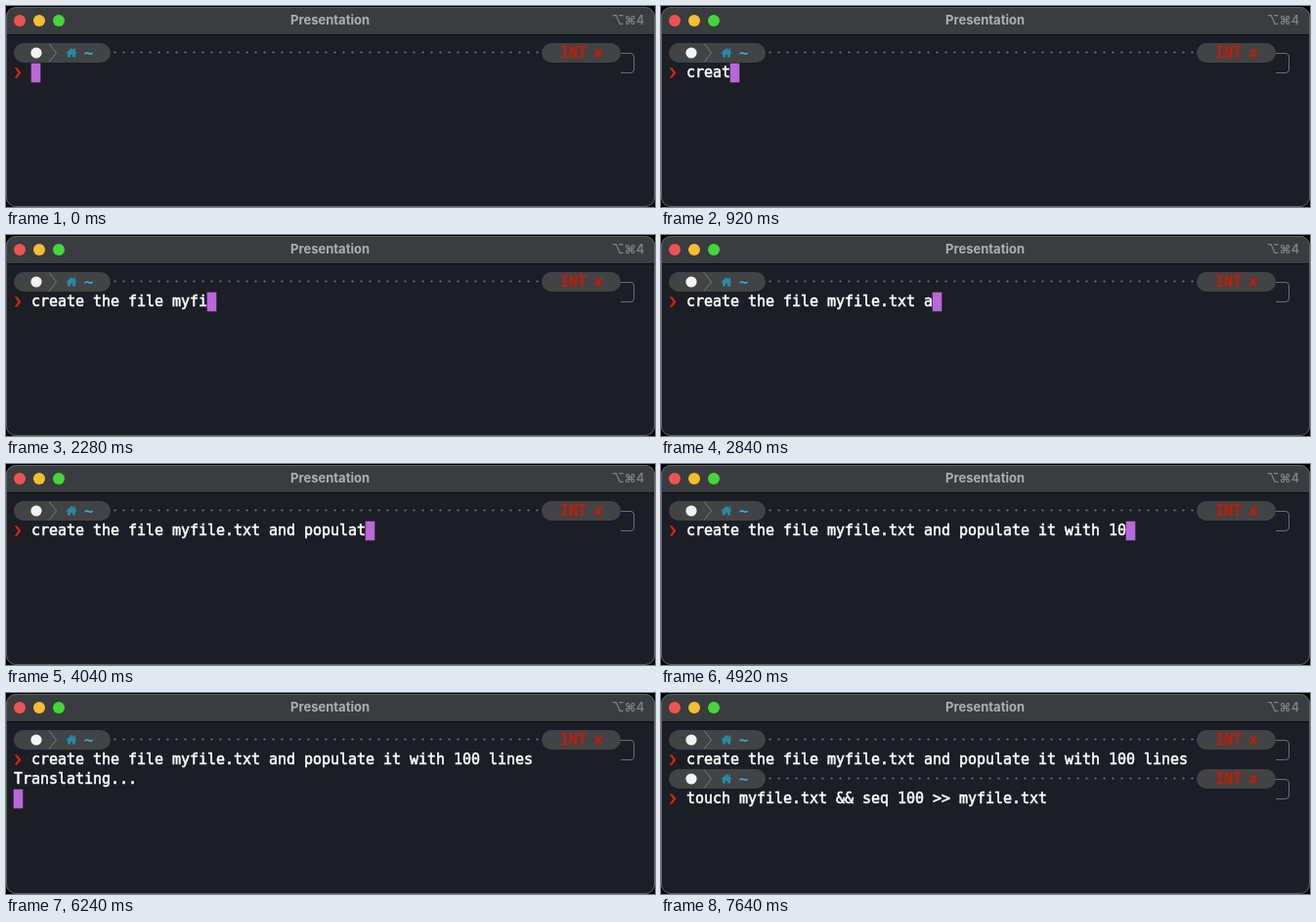
Recreate the animation shown at these times as an HTML page with a canvas. Size 664 by 206 pixels, loop 7760 ms.

```html
<!DOCTYPE html>
<html lang="en">
<head>
<meta charset="utf-8">
<title>Presentation</title>
<style>
html, body { margin: 0; width: 100%; height: 100%; overflow: hidden; background: #000; }
canvas { display: block; width: 664px; height: 206px; }
</style>
</head>
<body>
<canvas id="stage"></canvas>
<script>
const W = 664, H = 206, LOOP = 7760, TICK = 40;
const CELL = 9, ROW = 20, LEFT = 8, INPUT = 26;
const MONO = '"DejaVu Sans Mono", "Noto Sans Mono", monospace';
const SANS = 'Inter, "DejaVu Sans", sans-serif';
const REQUEST = 'create the file myfile.txt and populate it with 100 lines';
const COMMAND = 'touch myfile.txt && seq 100 >> myfile.txt';
const RED = '#c41d08';

// Typing rhythm: [characters typed, time in ms], even in between.
const KEYS = [
  [0, 520], [1, 600], [11, 1280], [12, 1360], [15, 1560], [16, 1640],
  [17, 1800], [18, 1920], [19, 2160], [28, 2840], [29, 2920], [30, 2960],
  [31, 3040], [32, 3360], [33, 3480], [34, 3760], [38, 4040], [43, 4440],
  [44, 4560], [50, 4920], [51, 4960], [55, 5280], [56, 5360], [57, 5560]
];

const canvas = document.getElementById('stage');
const ctx = canvas.getContext('2d');
const dpr = window.devicePixelRatio || 1;
canvas.width = W * dpr;
canvas.height = H * dpr;
ctx.scale(dpr, dpr);

const rowY = row => 48 + ROW * row;

function typedAt(t) {
  let i = KEYS.length - 1;
  while (i > 0 && KEYS[i][1] > t) i--;
  const [n, start] = KEYS[i];
  if (i === KEYS.length - 1) return n;
  const [next, end] = KEYS[i + 1];
  const part = Math.max(0, (t - start) / (end - start));
  return Math.min(next - 1, n + Math.floor((next - n) * part + 0.01));
}

function box(x, y, w, h, r, fill) {
  ctx.beginPath();
  ctx.roundRect(x, y, w, h, r);
  ctx.fillStyle = fill;
  ctx.fill();
}

function dot(x, y, r, fill) {
  ctx.beginPath();
  ctx.arc(x, y, r, 0, Math.PI * 2);
  ctx.fillStyle = fill;
  ctx.fill();
}

function trace(points) {
  ctx.beginPath();
  points.forEach(([x, y]) => ctx.lineTo(x, y));
}

function line(points, color, width) {
  trace(points);
  ctx.strokeStyle = color;
  ctx.lineWidth = width;
  ctx.stroke();
}

function shape(points, fill) {
  trace(points);
  ctx.fillStyle = fill;
  ctx.fill();
}

function label(str, x, y, font, color, align) {
  ctx.font = font;
  ctx.textAlign = align;
  ctx.fillStyle = color;
  ctx.fillText(str, x, y);
}

// Terminal text sits on a fixed character grid.
function cells(str, x, row, color = '#fff') {
  ctx.font = '15px ' + MONO;
  ctx.textAlign = 'left';
  ctx.fillStyle = ctx.strokeStyle = color;
  ctx.lineWidth = 0.55;
  [...str].forEach((ch, i) => {
    ctx.fillText(ch, x + i * CELL, rowY(row) + 5);
    ctx.strokeText(ch, x + i * CELL, rowY(row) + 5);
  });
}

function cursor(x, row) {
  ctx.fillStyle = '#b968d7';
  ctx.fillRect(x - 0.3, rowY(row) - 9.3, CELL + 0.6, 19.6);
}

function house(x, y) {
  const color = '#2789a6';
  shape([[x - 6, y + 0.5], [x, y - 5], [x + 6, y + 0.5]], color);
  ctx.fillRect(x - 4, y, 3, 4.5);
  ctx.fillRect(x + 1, y, 3, 4.5);
  ctx.fillRect(x - 4, y - 1, 8, 3);
  ctx.fillRect(x + 2.5, y - 4.5, 1.6, 3);
}

function prompt(row) {
  const y = rowY(row), pill = '#424344';
  box(8, y - 10, 99, 20, 10, pill);
  dot(31, y, 5.6, '#f4f4f4');
  line([[44, y - 9.5], [51.5, y], [44, y + 9.5]], '#77797a', 1);
  house(67, y);
  label('~', 84.5, y + 6, 'bold 16px ' + MONO, '#2cb2e2', 'center');

  for (let x = 111.5; x < 547; x += CELL) dot(x, y - 0.5, 1.1, '#74767a');

  box(548, y - 10, 81, 20, 10, pill);
  cells('INT', 567, row, RED);
  label('✘', 606, y + 4.8, '13px "DejaVu Sans", sans-serif', RED, 'center');

  ctx.beginPath();
  ctx.moveTo(629, y + 0.5);
  ctx.lineTo(639, y + 0.5);
  ctx.arcTo(642.5, y + 0.5, 642.5, y + 4, 3.5);
  ctx.lineTo(642.5, y + 17);
  ctx.arcTo(642.5, y + 20.5, 639, y + 20.5, 3.5);
  ctx.lineTo(629, y + 20.5);
  ctx.strokeStyle = '#6b6d70';
  ctx.lineWidth = 1;
  ctx.stroke();

  const m = y + 20.5;
  shape([[8.8, m - 5.3], [11.3, m - 5.3], [15.4, m], [11.3, m + 5.3],
    [8.8, m + 5.3], [12.4, m]], '#e0200f');
}

function chrome() {
  ctx.fillStyle = '#000';
  ctx.fillRect(0, 0, W, H);
  box(0, 1, W, H - 1, 10, '#1b1e25');
  box(0, 1, W, 28, [10, 10, 0, 0], '#3a3d3f');
  ctx.fillStyle = '#0b0c0e';
  ctx.fillRect(1, 29, W - 2, 1);
  ctx.beginPath();
  ctx.roundRect(0.5, 1.5, W - 1, H - 2, 9.5);
  ctx.strokeStyle = '#606365';
  ctx.lineWidth = 1;
  ctx.stroke();

  ['#ef5350', '#f5bd2f', '#45d63c'].forEach((c, i) => dot(14 + 20 * i, 15, 6, c));
  label('Presentation', 331.5, 19.4, '700 13px ' + SANS, '#adb0b2', 'center');
  label('⌥⌘4', 653, 18.5, '600 12.5px ' + SANS, '#7f8284', 'right');
}

function draw(t) {
  chrome();
  prompt(0);

  const typed = typedAt(t);
  cells(REQUEST.slice(0, typed), INPUT, 1);

  if (t < 6200) {
    if (t < 240 || t >= 520) cursor(INPUT + typed * CELL, 1);
  } else if (t < 6600) {
    cells('Translating...', LEFT, 2);
    cursor(LEFT, 3);
  } else {
    prompt(2);
    cells(COMMAND, INPUT, 3);
    const shown = t < 7000 || (t >= 7320 && t < 7640);
    if (shown) cursor(INPUT + COMMAND.length * CELL, 3);
  }

  if (t >= 5800 && t < 6240) box(494, 135, 155, 54, 8, '#303338');
}

function tick() {
  const t = performance.now() % LOOP;
  draw(Math.floor(t / TICK) * TICK);
  requestAnimationFrame(tick);
}
tick();
</script>
</body>
</html>
```
